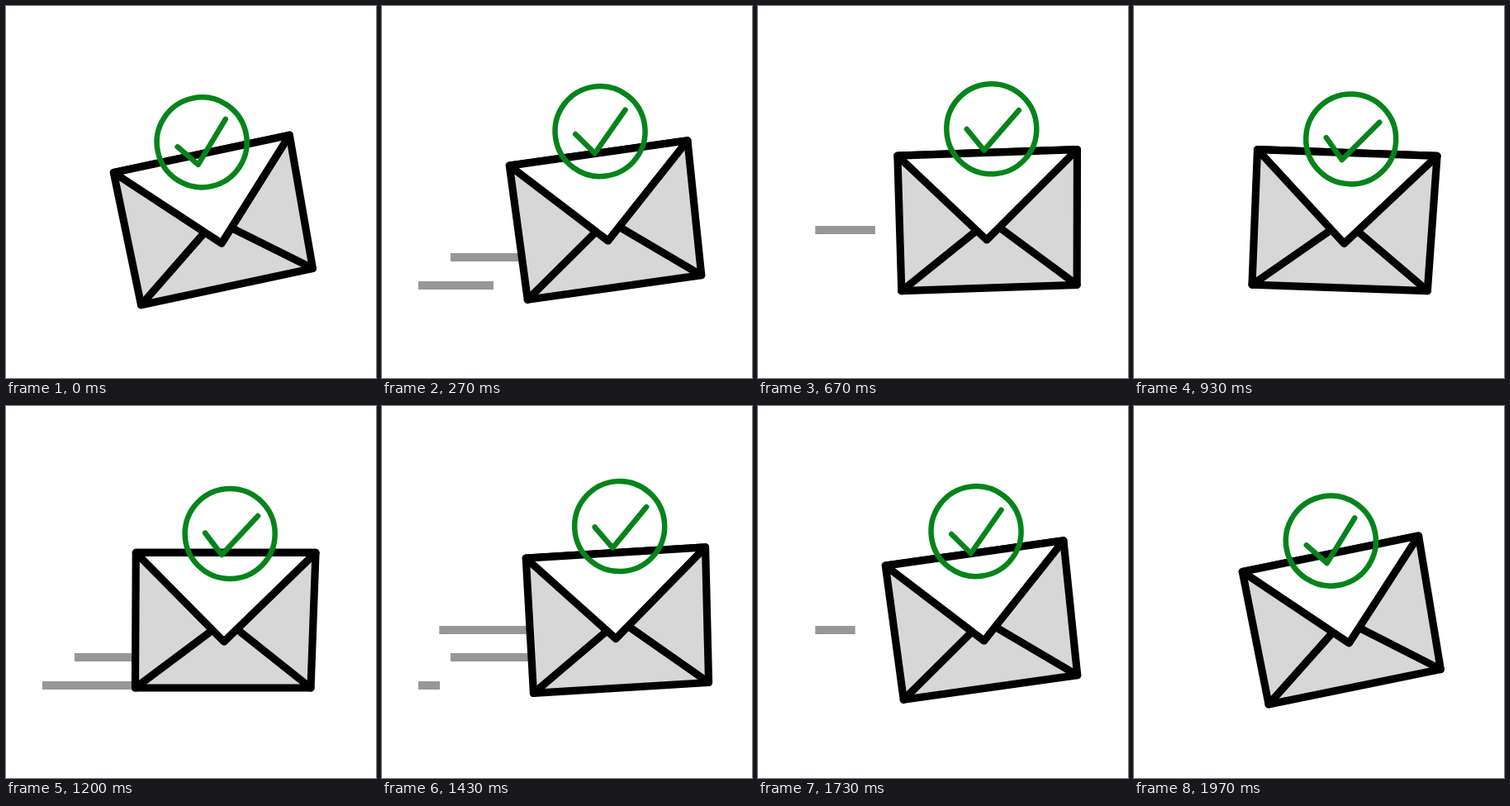
Animation, 448 px wide and 450 px high, one loop 2.01 s. Source, as an HTML page with a canvas:

```html
<!DOCTYPE html>
<html lang="en">
<head>
<meta charset="utf-8">
<title>Message sent</title>
<style>
  html, body { margin: 0; width: 100%; height: 100%; overflow: hidden; background: #fff; }
  canvas { display: block; }
</style>
</head>
<body>
<canvas id="stage" width="448" height="450"></canvas>
<script>
const ctx = document.getElementById('stage').getContext('2d');
const LOOP = 2010, STEPS = 60, HALF = STEPS / 2;
const INK = { stroke: '#000', width: 9.2 };
const GREEN = { stroke: '#04841a', width: 6.5 };

// Speed lines: left end, top, first and last step, pixels lost per step
const streaks = [
  { x: 44, y: 333, from: 0, to: 15, rate: 13 },
  { x: 83, y: 299, from: 5, to: 20, rate: 14 },
  { x: 69.3, y: 266, from: 10, to: 26, rate: 12.1 }
];

const TL = [-107.2, -81.8], TR = [110.5, -81.8], BR = [104.5, 81.8], BL = [-108, 81.8];

function paint({ stroke, width }, fill) {
  if (fill) { ctx.fillStyle = fill; ctx.fill(); }
  ctx.strokeStyle = stroke;
  ctx.lineWidth = width;
  ctx.stroke();
}

function shape(points, pen, fill) {
  ctx.beginPath();
  points.forEach(p => ctx.lineTo(...p));
  if (fill) ctx.closePath();
  paint(pen, fill);
}

function drawStreaks(step) {
  ctx.fillStyle = '#979797';
  for (const { x, y, from, to, rate } of streaks) {
    if (step > from && step < to) ctx.fillRect(x, y, rate * (to - step), 10);
  }
}

function drawEnvelope(p) {
  const tip = [2.8 - 8.4 * p, 29.2 - 8.2 * p];
  shape([TL, TR, BR, BL], INK, '#d7d7d7');
  shape([BL, [1.5, 0], BR], INK);
  shape([TL, TR, tip], INK, '#fff');
}

function drawBadge(p) {
  const rise = 1.23 * p - 0.23 * p ** 4;
  ctx.translate(4.9 + 3.7 * rise, -95.4 - 19.2 * rise);
  ctx.beginPath();
  ctx.arc(0, 0, 54.5, 0, Math.PI * 2);
  paint(GREEN);
  shape([[-30, -0.8], [-10, 25.5], [33.8, -21.4]], GREEN);
}

function draw(now) {
  const step = Math.min(STEPS - 1, Math.floor((now % LOOP) * 0.03 + 0.101));
  const u = 1 - Math.abs(1 - step / HALF);   // there and back
  const p = 1 - Math.abs(2 * u - 1);         // peaks midway
  const sway = (1 - Math.cos(2 * Math.PI * u)) / 2;

  ctx.fillStyle = '#fff';
  ctx.fillRect(0, 0, 448, 450);
  drawStreaks(step % HALF);

  ctx.save();
  ctx.lineCap = ctx.lineJoin = 'round';
  ctx.translate(252.2 + 35.6 * sway, 259.2);
  ctx.rotate((15 * u - 12) * Math.PI / 180);
  drawEnvelope(p);
  drawBadge(p);
  ctx.restore();
}

const start = performance.now();
function tick() {
  draw(performance.now() - start);
  requestAnimationFrame(tick);
}
tick();
</script>
</body>
</html>
```
